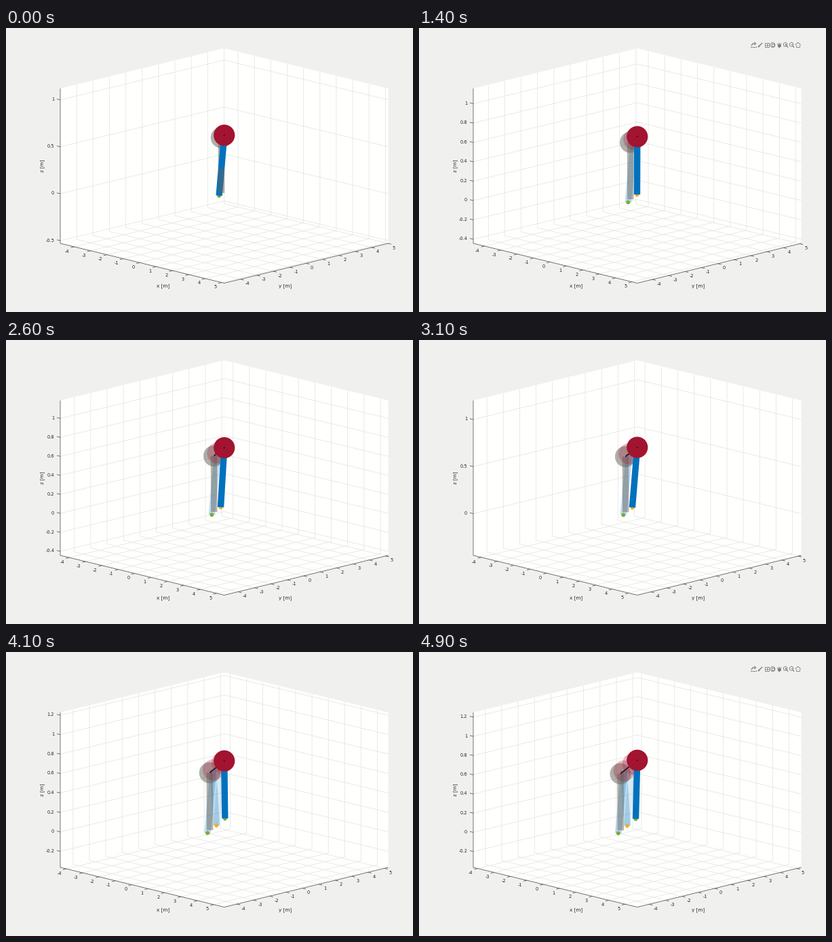
These frames come from a looping animation (600x418 px, 5000 ms). A matplotlib script:

```python
import math
import matplotlib.pyplot as plt
from matplotlib.animation import FuncAnimation
from matplotlib.collections import LineCollection
from matplotlib.patches import Circle, Polygon, Rectangle

W, H, DPI = 600, 418, 64
PT = 72 / DPI
FRAMES, INTERVAL = 50, 100

BLUE, RED = "#0072bd", "#a2142f"
GREEN, ORANGE = "#77ac30", "#edb120"
GRAY, INK = "#666661", "#262626"
ICON = "#777775"

LEFT, MID, RIGHT = 80, 321.75, 563.5
TOP, BASE = 89, 317
UX, UY = 24.15, 5.85          # pixels per metre along the slanted axes

# Footholds: distance along the path, height, colour
FEET = [(-0.155, -0.032, GREEN), (0.39, 0.054, ORANGE), (0.91, 0.132, GREEN)]
STEPS = (2, 33)
START = -10.7

fig = plt.figure(figsize=(W / DPI, H / DPI), dpi=DPI, facecolor="#f0f0ee")
ax = fig.add_axes([0, 0, 1, 1])


def body(t):
    """Distance along the path and height of the hip."""
    return 0.16 + 0.0172 * t, 0.618 + 0.00261 * t


def stance(t):
    return sum(t >= s for s in STEPS)


def line(points, color=ICON, width=0.8, z=8):
    xs, ys = zip(*points)
    ax.plot(xs, ys, color=color, lw=width * PT, zorder=z, solid_capstyle="butt")


def text(x, y, s, size=6.6, **kw):
    kw = {"ha": "center", "va": "center_baseline", "color": INK, **kw}
    ax.text(x, y, s, fontsize=size * PT, family="DejaVu Sans", **kw)


def disc(p, r, color, alpha=1.0, z=4):
    ax.add_patch(Circle(p, r, fc=color, ec="none", alpha=alpha, zorder=z))


def leg(top, foot, color=BLUE, alpha=1.0, z=5, width=9.4):
    (x0, y0), (x1, y1) = top, foot
    n = math.hypot(x1 - x0, y1 - y0)
    dx, dy = (y1 - y0) / n * width / 2, (x0 - x1) / n * width / 2
    pts = [(x0 - dx, y0 - dy), (x0 + dx, y0 + dy),
           (x1 + dx, y1 + dy), (x1 - dx, y1 - dy)]
    ax.add_patch(Polygon(pts, fc=color, ec="none", alpha=alpha, zorder=z))


def draw_axes(t, zmin, zmax):
    cx, cy = 0.15 + 0.0118 * t, 0.01 + 0.0054 * t
    scale = (BASE - TOP) / (zmax - zmin)
    height = BASE - TOP
    back, front = BASE - 58.5, BASE + 58.5
    walls = [
        [(LEFT, TOP), (MID, TOP - 59), (MID, back), (LEFT, BASE)],
        [(MID, TOP - 59), (RIGHT, TOP), (RIGHT, BASE), (MID, back)],
        [(LEFT, BASE), (MID, back), (RIGHT, BASE), (MID, front)],
    ]
    for wall in walls:
        ax.add_patch(Polygon(wall, fc="#fffffe", ec="#fffffe", lw=0.3, zorder=0))

    grid, ticks = [], []
    for v in range(-5, 7):
        u = v - cx + 5
        if 0 <= u <= 10:
            x, y = LEFT + u * UX, BASE + u * UY
            bx, by = x + 10 * UX, y - 10 * UY
            grid += [[(x, y), (bx, by)], [(bx, by), (bx, by - height)]]
            ticks.append([(x, y), (x - 5, y + 1.2)])
            text(x - 7, y + 6.2, str(v), ha="right")
        u = v - cy + 5
        if 0 <= u <= 10:
            x, y = MID + u * UX, front - u * UY
            bx, by = x - 10 * UX, y - 10 * UY
            grid += [[(x, y), (bx, by)], [(bx, by), (bx, by - height)]]
            ticks.append([(x, y), (x + 5, y + 1.2)])
            text(x + 6.8, y + 6, str(v), ha="left")

    step = 0.5 if zmax - zmin > 1.643 else 0.2
    for k in range(math.ceil(zmin / step), math.floor(zmax / step) + 1):
        y = BASE - (k * step - zmin) * scale + 0.7
        grid.append([(LEFT, y), (MID, y - 58.5), (RIGHT, y)])
        ticks.append([(LEFT, y), (LEFT - 5, y - 1.2)])
        text(71.2, y - 1, f"{k * step:.1f}".replace(".0", "") if k else "0",
             ha="right")

    ax.add_collection(LineCollection(grid, colors="#e5e5e4", linewidths=0.8 * PT,
                                     zorder=1, snap=False))
    ticks.append([(LEFT, TOP), (LEFT, BASE), (MID, front), (RIGHT, BASE)])
    ax.add_collection(LineCollection(ticks, colors="#555555", linewidths=0.8 * PT, zorder=2))
    text(231.5, 379.2, "x [m]", 7.2)
    text(411.5, 379.2, "y [m]", 7.2)
    text(53.5, 202.5, "z [m]", 7.2, rotation=90, va="center")


def ring(x, y, r):
    ax.add_patch(Circle((x, y), r, fc="none", ec=ICON, lw=0.8 * PT, zorder=8))


def draw_toolbar(y=25):
    line([(489, y + 2), (489, y + 3), (497, y + 3), (497, y + 2)])
    line([(490, y + 1), (492, y - 2), (496, y - 2)], width=1.2)
    line([(494, y - 4), (497, y - 2), (494, y)])
    line([(500, y + 3), (502, y + 1)], width=2)
    line([(502, y + 1), (506, y - 3)], width=1.3)
    ax.add_patch(Rectangle((509.5, y - 3), 6.5, 6, fc="none", ec=ICON, lw=0.8 * PT, zorder=8))
    line([(511, y), (515, y)])
    line([(513, y - 2), (513, y + 2)])
    ring(521.5, y, 3.4)
    ax.add_patch(Rectangle((519.7, y - 1.8), 3.6, 3.6, fc="none", ec=ICON, lw=0.8 * PT, zorder=8))
    disc((531.3, y + 1.5), 2.3, ICON, z=8)
    for i in range(4):
        line([(529.2 + 1.3 * i, y + 1), (528.6 + 1.7 * i, y - 3.2 + abs(i - 1.5) * 0.6)])
    for x in (540, 549):
        ring(x, y - 0.7, 2.8)
        line([(x + 2, y + 1.4), (x + 4.2, y + 3.6)], width=1.2)
        line([(x - 1.5, y - 0.7), (x + 1.5, y - 0.7)])
    line([(540, y - 2.2), (540, y + 0.8)])
    line([(554.7, y), (558.7, y - 3.7), (562.7, y)])
    line([(556, y - 0.5), (556, y + 3.3), (561.4, y + 3.3), (561.4, y - 0.5)])


def draw(t):
    ax.cla()
    ax.set(xlim=(0, W), ylim=(H, 0))
    ax.axis("off")

    here, hip_z = body(t)
    current = stance(t)
    zmin, zmax = FEET[current][1] - 0.502, hip_z + 0.498
    scale = (BASE - TOP) / (zmax - zmin)
    draw_axes(t, zmin, zmax)

    def place(s, z):
        u = s - here
        return MID + UX * u, BASE + 2.1 * u - (z - zmin) * scale

    feet = [place(s, z) for s, z, _ in FEET]
    hip = place(here, hip_z)
    first = place(*body(START))
    touch = [place(*body(s)) for s in STEPS[:current]]

    # Faded poses left behind at the touchdowns
    if current > 0:
        leg(touch[0], feet[0], alpha=0.26, z=3)
    if current > 1:
        leg(touch[0], feet[1], alpha=0.26, z=3)
        leg(touch[1], feet[1], alpha=0.14, z=3)
    for p in touch:
        disc(p, 15.5, RED, 0.28, z=3.4)

    foot0 = (first[0] + 0.3, first[1] + 0.59 * scale)
    split = (first[0] + 0.15, first[1] + 0.33 * scale)
    leg(first, split, GRAY, 0.5, z=3.2)
    leg(split, foot0, GRAY, 0.5, z=5.5)
    if 2 <= t < 13:
        disc(first, 15.5, RED, 0.3, z=3.3)
    else:
        disc(first, 15.5, GRAY, 0.52, z=3.3)

    line([first, hip], "#1a1015", 1.6, z=4)
    for p, (_, _, color) in list(zip(feet, FEET))[:current + 1]:
        disc(p, 2.9, color, z=4.5)
    leg(hip, (feet[current][0], feet[current][1] - 0.3), z=5)
    disc(hip, 15.6, RED, z=6)
    disc(hip, 1.1, "#4a0a18", z=7)

    if 11 <= t < 15 or t >= 46:
        draw_toolbar()
    return []


anim = FuncAnimation(fig, draw, frames=FRAMES, interval=INTERVAL,
                     init_func=lambda: [], repeat=True, repeat_delay=0)
plt.show()
```
